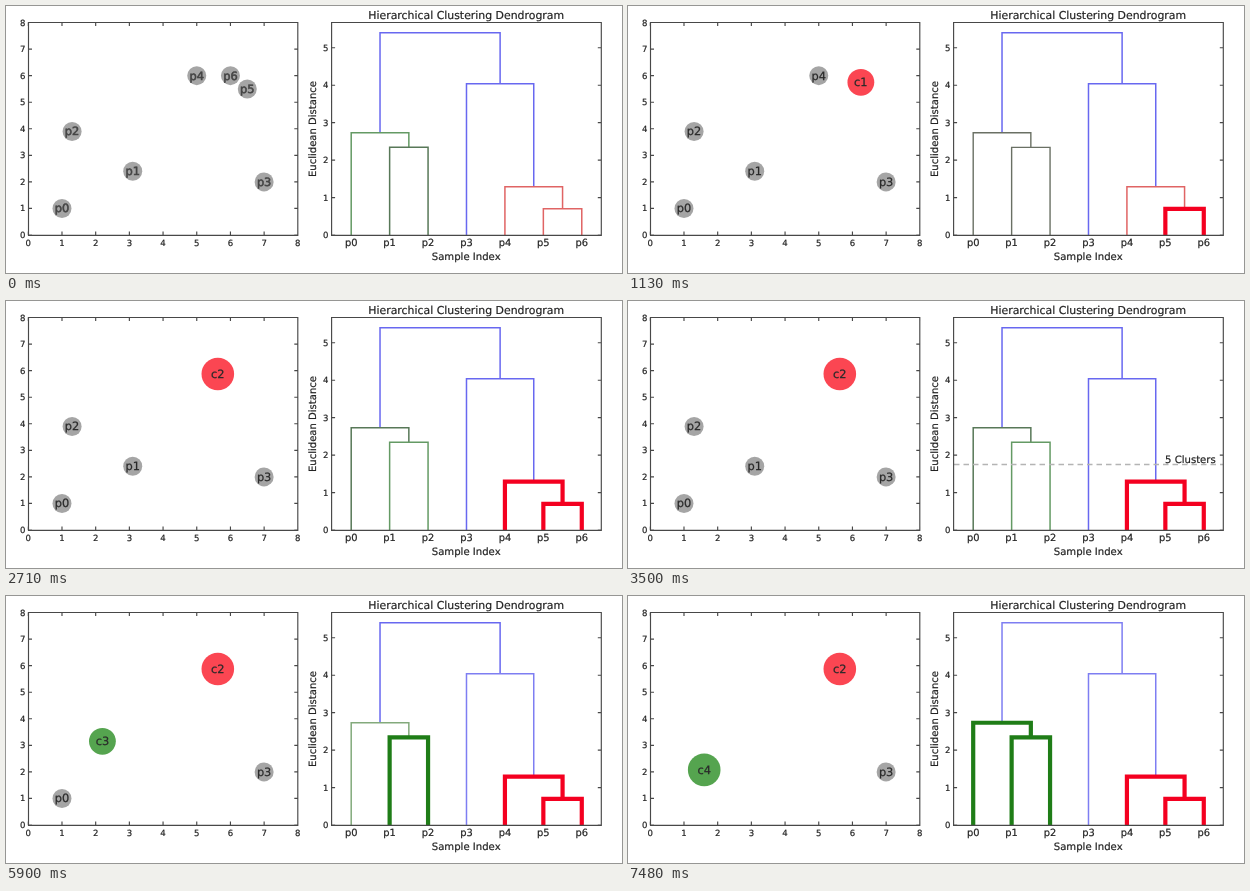
An HTML page for the animation above (8 s loop, 616 by 267 pixels).

```html
<!DOCTYPE html>
<html lang="en">
<head>
<meta charset="utf-8">
<title>Hierarchical clustering</title>
<style>
html, body { margin: 0; width: 100%; height: 100%; overflow: hidden; background: #fff; }
svg { display: block; width: 616px; height: 267px; font-family: "DejaVu Sans", sans-serif; }
text { fill: #222; stroke: #222; stroke-width: .2px; text-rendering: geometricPrecision; }
</style>
</head>
<body>
<svg id="stage" viewBox="0 0 616 267">
  <g id="axes"></g>
  <g id="links" fill="none"></g>
  <g id="cut">
    <path d="M326 163.5H595" stroke="#b4b4b4" stroke-width="1.7" stroke-dasharray="5.5 4"/>
    <text x="537" y="161.5" font-size="10.1">5 Clusters</text>
  </g>
  <path id="frames" fill="none" stroke="#484848" stroke-width="1.15"/>
  <g id="dots"></g>
</svg>
<script>
const LOOP = 8000;
const BASE = 229, TOP = 16.5;
const el = id => document.getElementById(id);

// Plot coordinates to pixels
const px = x => 22.3 + x * 33.69;
const py = y => BASE - y * 26.56;
const leafX = i => 345.2 + i * 38.43;
const distY = d => BASE - d * 37.45;

// name: x, y, radius, fill
const POINTS = {
  p0: [1, 1], p1: [3.1, 2.4], p2: [1.3, 3.9], p3: [7, 2],
  p4: [5, 6], p5: [6.5, 5.5], p6: [6, 6],
  c1: [6.25, 5.75, 13.4, '#fb4652'], c2: [5.625, 5.875, 16.3, '#fb4652'],
  c3: [2.2, 3.15, 13.4, '#55a44f'], c4: [1.6, 2.075, 16.3, '#55a44f']
};

// Merges: left x, left height, right x, right height, height (x in leaf units)
const MERGES = [
  [0.75, 2.73, 3.875, 4.04, 5.4],
  [3, 0, 4.75, 1.29, 4.04],
  [0, 0, 1.5, 2.34, 2.73],
  [1, 0, 2, 0, 2.34],
  [4, 0, 5.5, 0.7, 1.29],
  [5, 0, 6, 0, 0.7]
];

const PENS = {
  b: ['#6868f0', 1.5], f: ['#7e7ef2', 1.5], v: ['#8585b5', 1.5],
  r: ['#e06464', 1.5], g: ['#649a64', 1.5], l: ['#83aa7c', 1.5],
  d: ['#587858', 1.5], k: ['#6a7064', 1.4], n: ['#777', 1.5],
  h: ['#777', 2.6], R: ['#f40020', 4.2], G: ['#1f7d17', 4.2]
};

// One pen per merge, in the order of MERGES; ring: centre name and radius
const STEPS = [
  { at: 0, dots: 'p0 p1 p2 p3 p4 p5 p6', pens: 'bbgdrr', heavy: true },
  { at: 330, dots: 'p0 p1 p2 p3 p4 p5 p6', pens: 'bbkkrh', heavy: true, ring: ['c1', 23] },
  { at: 1130, dots: 'p0 p1 p2 p3 p4 c1', pens: 'bbkkrR' },
  { at: 1920, dots: 'p0 p1 p2 p3 p4 c1', pens: 'bbkkhR', heavy: true, ring: ['c2', 33.4] },
  { at: 2710, dots: 'p0 p1 p2 p3 c2', pens: 'bbdgRR' },
  { at: 3500, dots: 'p0 p1 p2 p3 c2', pens: 'bbdgRR', cut: true },
  { at: 5110, dots: 'p0 p1 p2 p3 c2', pens: 'bvnhRR', heavy: true, ring: ['c3', 51.4], grey: '#9c9cb2' },
  { at: 5900, dots: 'p0 p3 c2 c3', pens: 'bflGRR' },
  { at: 6690, dots: 'p0 p3 c2 c3', pens: 'bfhGRR', heavy: true, ring: ['c4', 50] },
  { at: 7480, dots: 'p3 c2 c4', pens: 'ffGGRR' }
];

const text = (s, x, y, size, anchor = 'middle', more = '') =>
  `<text x="${x}" y="${y}" font-size="${size}" text-anchor="${anchor}" ${more}>${s}</text>`;

function drawAxes() {
  let labels = '', lines = `M22.5 ${TOP}H291.8V229.3H22.5ZM325.6 ${TOP}H595.3V229.3H325.6Z`;
  for (let i = 0; i <= 8; i++) {
    const x = px(i), y = py(i);
    labels += text(i, x, 240.3, 8.5) + text(i, 19.5, y + 3, 8.5, 'end');
    lines += `M${x} 229v-3.5M${x} ${TOP}v3.5M22.5 ${y}h3.5M291.8 ${y}h-3.5`;
  }
  for (let i = 0; i <= 5; i++) {
    const y = distY(i);
    labels += text(i, 322.5, y + 3, 8.5, 'end');
    lines += `M325.6 ${y}h3.5M595.3 ${y}h-3.5`;
  }
  for (let i = 0; i < 7; i++) labels += text('p' + i, leafX(i), 240.3, 9.9);
  labels += text('Hierarchical Clustering Dendrogram', 460.2, 13, 10.9);
  labels += text('Sample Index', 460.2, 253.5, 10.1);
  labels += text('Euclidean Distance', 0, 0, 10.05, 'middle', 'transform="translate(310.3 123) rotate(-90)"');
  el('axes').innerHTML = labels;
  el('frames').setAttribute('d', lines);
}

function drawMerge([x1, d1, x2, d2, d], pen) {
  const [color, width] = PENS[pen];
  return `<path d="M${leafX(x1)} ${distY(d1)}V${distY(d)}H${leafX(x2)}V${distY(d2)}" stroke="${color}" stroke-width="${width}"/>`;
}

function drawDot(name, step) {
  const [x, y, r = 9.5, fill = step.grey || '#a5a5a5'] = POINTS[name];
  const ink = !step.heavy ? '#2a2a2a' : name[0] === 'c' ? '#7c1f2b' : '#444';
  const weight = step.heavy ? 0.6 : 0.25;
  return `<circle cx="${px(x)}" cy="${py(y)}" r="${r}" fill="${fill}"/>` +
    text(name, px(x), py(y) + 4, 11.4, 'middle', `style="fill:${ink};stroke:${ink};stroke-width:${weight}px"`);
}

function drawRing([name, r]) {
  const [x, y] = POINTS[name];
  return `<circle cx="${px(x)}" cy="${py(y)}" r="${r}" fill="none" stroke="#999"/>`;
}

let shown;
function render(now) {
  const t = now % LOOP;
  const step = STEPS.findLast(s => s.at <= t);
  if (step !== shown) {
    shown = step;
    el('links').innerHTML = MERGES.map((m, i) => drawMerge(m, step.pens[i])).join('');
    el('dots').innerHTML = (step.ring ? drawRing(step.ring) : '') +
      step.dots.split(' ').map(name => drawDot(name, step)).join('');
    el('cut').style.display = step.cut ? '' : 'none';
  }
}

drawAxes();
const start = performance.now();
function tick() {
  render(performance.now() - start);
  requestAnimationFrame(tick);
}
tick();
</script>
</body>
</html>
```
